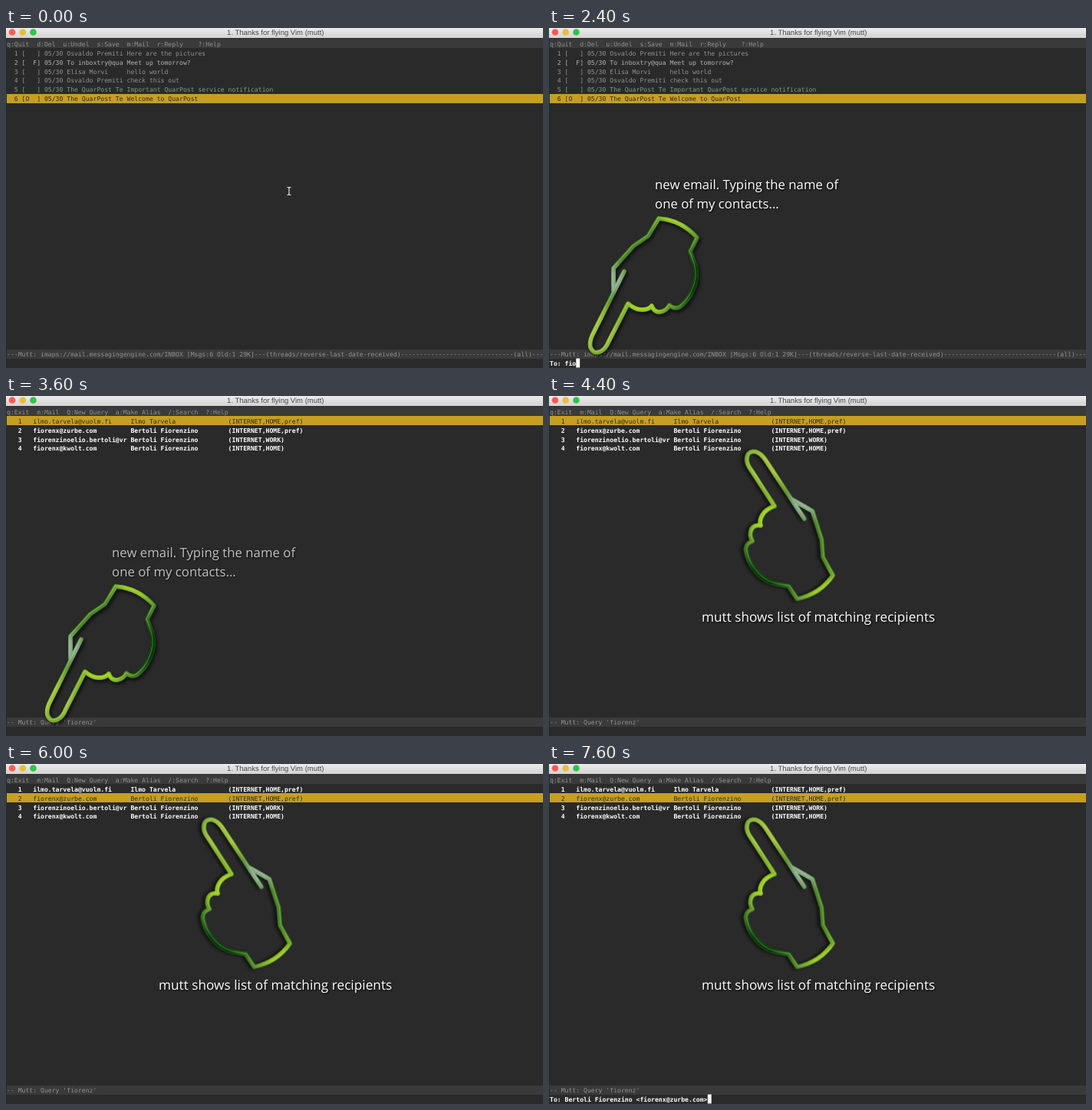
An HTML page for the animation above (8 s loop, 700x443 px).

```html
<!DOCTYPE html>
<html lang="en">
<head>
<meta charset="utf-8">
<title>Terminal mail</title>
<style>
  html, body { margin: 0; width: 100%; height: 100%; overflow: hidden; background: #2a2a2a; }
  svg { display: block; width: 100%; height: 100%; }
  text { white-space: pre; text-rendering: geometricPrecision; }
  .term text { font: 8.14px "DejaVu Sans Mono", monospace; fill: #929292; }
  .term .fresh { fill: #b4b4b4; }
  .term .bold { font-weight: bold; fill: #fff; }
  .term .selected { font-weight: normal; fill: #2c2a24; }
  .band { fill: #3a3a3a; }
  .cursor { fill: #fff; }
  .title { font: 9.5px "Liberation Sans", Arial, sans-serif; fill: #484848; text-anchor: middle; }
  .caption { font-family: "Open Sans", sans-serif; fill: #fff; filter: drop-shadow(1px 1px 1px #000); }
  .hand { fill: none; stroke-linejoin: round; stroke-linecap: round; filter: drop-shadow(2px 3px 2px rgba(0,0,0,.6)); }
</style>
</head>
<body>
<svg viewBox="0 0 700 443">
  <defs id="defs">
    <linearGradient id="bar" x2="0" y2="1">
      <stop stop-color="#ececec"/><stop offset="1" stop-color="#d2d2d2"/>
    </linearGradient>
    <path id="outline" d="M98 317L58 397Q52 408 54 416Q58 426 68 421Q74 418 78 408L103 359
      Q112 367 121 367Q130 367 134 362Q137 370 144 370Q153 369 157 361Q164 367 171 363
      Q182 354 187 342Q195 325 190 308L184 291L193 273Q172 250 143 248L129 271L110 284L84 313L84 344"/>
    <g id="hand" class="hand">
      <use href="#outline" stroke="#1c4a14" stroke-width="6.5"/>
      <use href="#outline" stroke="#4f8427" stroke-width="5"/>
      <g id="tints" stroke-width="5.5"></g>
      <use href="#outline" stroke="#e4ffd0" stroke-opacity=".25" stroke-width="1.2" transform="translate(-.8 -.8)"/>
    </g>
  </defs>

  <rect width="700" height="443" fill="#2a2a2a"/>
  <rect y="13" width="1" height="430" fill="#0b3440"/>
  <rect width="700" height="13" fill="url(#bar)"/>
  <circle cx="8" cy="5.5" r="4.3" fill="#fb5a52"/>
  <circle cx="21.7" cy="5.5" r="4.3" fill="#e8bd3a"/>
  <circle cx="35.5" cy="5.5" r="4.3" fill="#35c149"/>
  <text class="title" x="351.3" y="9.3">1. Thanks for flying Vim (mutt)</text>
  <rect class="band" x="1" y="14" width="699" height="12"/>
  <rect class="band" x="1" y="419" width="699" height="12"/>
  <rect id="highlight" x="1" width="699" height="12" fill="#c69f22"/>

  <g class="term">
    <g id="inbox"></g>
    <g id="query"></g>
    <text id="prompt" class="bold" x="1"></text>
    <rect id="cursor" class="cursor" y="430.5" width="4.9" height="11.9"/>
  </g>

  <path id="pointer" d="M366.5 207.5H368L369 208.5L370 207.5H371.5M369 208.5V216.5M366.5 217.5H368L369 216.5L370 217.5H371.5"
        fill="none" stroke="#eee" stroke-width="1.1"/>

  <use id="hand1" href="#hand"/>
  <g id="caption1" class="caption" font-size="16.8">
    <text x="138" y="209.5">new email. Typing the name of</text>
    <text x="138" y="234.5">one of my contacts...</text>
  </g>
  <g id="scene2">
    <use href="#hand" transform="translate(204 -349) rotate(120 58 422)"/>
    <text class="caption" font-size="17.24" x="199" y="293.5">mutt shows list of matching recipients</text>
  </g>
</svg>

<script>
const LOOP = 8000, CELL = 4.9, LINE = 11.88;
const $ = id => document.getElementById(id);
const show = (id, visible) => { $(id).style.display = visible ? '' : 'none'; };

// Soft colour patches along the hand's outline: x, y, radius, colour.
const tints = [
  [65, 395, 50, '#9fbe3a'],
  [84, 328, 28, '#8aa88a'],
  [122, 366, 42, '#9cc81c'],
  [165, 254, 34, '#94c020'],
  [191, 328, 50, '#053c06'],
];
tints.forEach(([x, y, r, color], i) => {
  $('defs').insertAdjacentHTML('beforeend',
    `<radialGradient id="tint${i}" gradientUnits="userSpaceOnUse" cx="${x}" cy="${y}" r="${r}">
       <stop offset=".3" stop-color="${color}"/><stop offset="1" stop-color="${color}" stop-opacity="0"/>
     </radialGradient>`);
  $('tints').insertAdjacentHTML('beforeend', `<use href="#outline" stroke="url(#tint${i})"/>`);
});

function addLine(parent, row, content, className = '') {
  const text = document.createElementNS('http://www.w3.org/2000/svg', 'text');
  text.setAttribute('x', 1);
  text.setAttribute('y', 23.9 + row * LINE);
  text.setAttribute('class', className);
  text.textContent = content;
  $(parent).append(text);
  return text;
}

const mails = [
  ['   ', 'Osvaldo Premiti', 'Here are the pictures'],
  ['  F', 'To inboxtry@qua', 'Meet up tomorrow?'],
  ['   ', 'Elisa Morvi', 'hello world'],
  ['   ', 'Osvaldo Premiti', 'check this out'],
  ['   ', 'The QuarPost Te', 'Important QuarPost service notification'],
  ['O  ', 'The QuarPost Te', 'Welcome to QuarPost'],
];
const contacts = [
  ['ilmo.tarvela@vuolm.fi', 'Ilmo Tarvela', 'HOME,pref'],
  ['fiorenx@zurbe.com', 'Bertoli Fiorenzino', 'HOME,pref'],
  ['fiorenzinoelio.bertoli@vr', 'Bertoli Fiorenzino', 'WORK'],
  ['fiorenx@kwolt.com', 'Bertoli Fiorenzino', 'HOME'],
];

addLine('inbox', 0, 'q:Quit  d:Del  u:Undel  s:Save  m:Mail  r:Reply    ?:Help');
mails.forEach(([flags, sender, subject], i) =>
  addLine('inbox', i + 1, `  ${i + 1} [${flags}] 05/30 ${sender.padEnd(15)} ${subject}`,
    ['', 'fresh', '', '', '', 'selected'][i]));
addLine('inbox', 34, '---Mutt: imaps://mail.messagingengine.com/INBOX [Msgs:6 Old:1 29K]---(threads/reverse-last-date-received)'
  .padEnd(135, '-') + '(all)---');

addLine('query', 0, 'q:Exit  m:Mail  Q:New Query  a:Make Alias  /:Search  ?:Help');
const contactLines = contacts.map(([address, name, kind], i) =>
  addLine('query', i + 1, `   ${i + 1}   ${address.padEnd(25)} ${name.padEnd(26)}(INTERNET,${kind})`));
addLine('query', 34, "-- Mutt: Query 'fiorenz'");
$('prompt').setAttribute('y', 23.9 + 35 * LINE);

// Each track lists [start time, value]; a value holds until the next start.
const prompts = [[0, ''], [1600, 'To: '], [2400, 'To: fio'], [2800, 'To: fiore'], [3200, 'To: fiorenz'],
  [3600, ''], [7600, 'To: Bertoli Fiorenzino <fiorenx@zurbe.com>']];
const selections = [[0, 6], [3600, 1], [5200, 2], [6800, 3], [7200, 2]];
const hand1Fade = [[0, 0], [800, 1], [4000, .5], [4400, 0]];
const caption1Fade = [[0, 0], [800, 1], [3600, .7], [4000, 0]];
const at = (track, t) => track.findLast(([start]) => start <= t)[1];

function render(t) {
  const querying = t >= 3600, selected = at(selections, t), prompt = at(prompts, t);
  show('inbox', !querying);
  show('query', querying);
  show('pointer', t < 1200);
  show('scene2', t >= 4000);
  show('cursor', prompt);
  $('highlight').setAttribute('y', Math.round(14.4 + selected * LINE));
  contactLines.forEach((line, i) => line.setAttribute('class', i + 1 === selected ? 'selected' : 'bold'));
  $('prompt').textContent = prompt;
  $('cursor').setAttribute('x', 1 + prompt.length * CELL);
  $('hand1').style.opacity = at(hand1Fade, t);
  $('caption1').style.opacity = at(caption1Fade, t);
}

const begin = performance.now();
function tick() {
  render((performance.now() - begin) % LOOP);
  requestAnimationFrame(tick);
}
tick();
</script>
</body>
</html>
```
